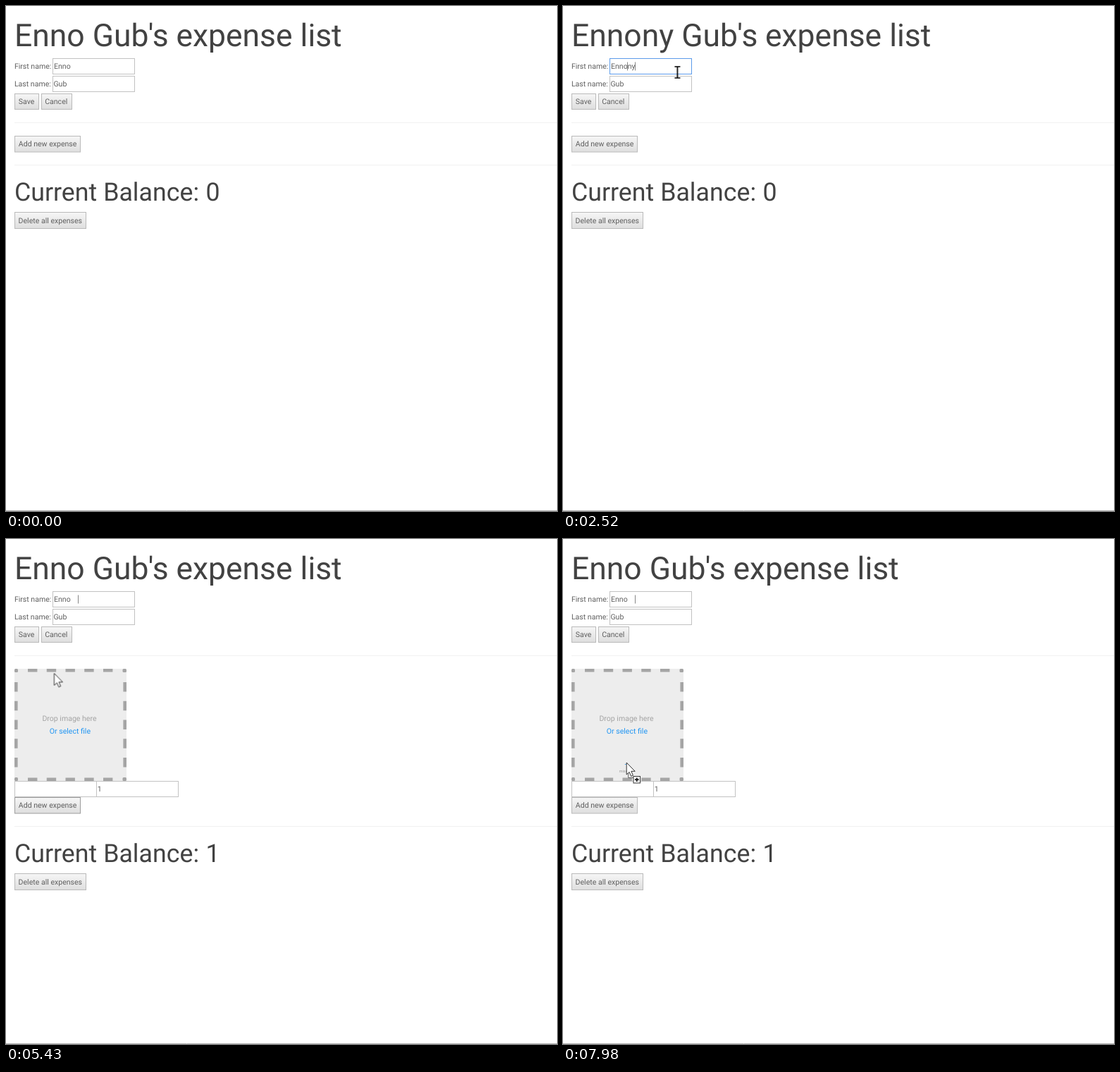
An HTML page that plays this animation: 782x716 px, repeating every 8 s.

```html
<!DOCTYPE html>
<html lang="en">
<head>
<meta charset="utf-8">
<title>Expense list</title>
<style>
  html, body { margin: 0; width: 100%; height: 100%; overflow: hidden; background: #fff; }
  svg { display: block; font: 10.55px Roboto, sans-serif; fill: #5f5f5f; text-rendering: geometricPrecision; }
  .h1 { font-size: 44.45px; fill: #424242; }
  .h2 { font-size: 35.75px; fill: #424242; }
  .field { fill: #fff; stroke: #c2c2c2; }
  .btn { fill: url(#face); stroke: #bababa; }
  .rule { stroke: #f1f1f1; }
  .caret { stroke: #858585; }
  .dash { stroke: #a5a5a5; stroke-width: 4.6; stroke-dasharray: 13.4 13.35; }
  .corner { fill: #a5a5a5; }
  .pointer { fill: #fff; stroke: #111; stroke-width: .85; stroke-linejoin: round; }

  /* every animation shares one 8 s clock */
  .a { animation: 8s step-end -5ms infinite; }

  /* heading and typing */
  .name0 { animation-name: name0; }
  .name1 { animation-name: name1; }
  .name2 { animation-name: name2; }
  .key1 { animation-name: key1; }
  .key2 { animation-name: key2; }
  @keyframes name0 { 0%, 40.375% { visibility: visible } 28.75% { visibility: hidden } }
  @keyframes name1 { 0%, 31.5%, 40.375% { visibility: hidden } 28.75%, 39.5% { visibility: visible } }
  @keyframes name2 { 0%, 39.5% { visibility: hidden } 31.5% { visibility: visible } }
  @keyframes key1 { 0%, 39.5% { visibility: hidden } 27.625% { visibility: visible } }
  @keyframes key2 { 0%, 38.5% { visibility: hidden } 30.75% { visibility: visible } }

  /* focus ring and carets */
  .focus { fill: none; stroke: #5c9bea; animation-name: focus; }
  .caret0 { animation-name: caret0; }
  .caret1 { animation-name: caret1; }
  .caret2 { animation-name: caret2; }
  @keyframes focus { 0%, 63.875% { visibility: hidden } 17.875% { visibility: visible } }
  @keyframes caret0 { 0%, 60% { visibility: hidden } 17.875% { visibility: visible } }
  @keyframes caret1 { 0%, 30.75% { visibility: hidden } 27.625% { visibility: visible } }
  @keyframes caret2 { 0% { visibility: hidden } 30.75%, 100% { visibility: visible } }

  /* new expense */
  .added { animation-name: added; }
  .empty { animation-name: empty; }
  .lower { animation-name: lower; }
  .add { animation-name: hover; }
  .link { fill: #2196f3; animation-name: link; }
  @keyframes added { 0% { visibility: hidden } 65%, 100% { visibility: visible } }
  @keyframes empty { 0% { visibility: visible } 65%, 100% { visibility: hidden } }
  @keyframes lower { 0% { transform: none } 65%, 100% { transform: translateY(182px) } }
  @keyframes hover { 0%, 70.75% { stroke: #bababa } 60% { stroke: #9c9c9c } }
  @keyframes link { 0%, 82.625% { fill: #2196f3 } 77.5% { fill: #1976d2 } }

  /* pointer */
  .move { animation-name: move; }
  .arrow { animation-name: arrow; }
  .beam { animation-name: beam; }
  .hand { animation-name: hand; }
  .drag { animation-name: drag; }
  @keyframes move {
    0% { transform: translate(616px, 618px) }
    4.25% { transform: translate(616px, 618px); animation-timing-function: steps(4) }
    7.5% { transform: translate(305px, 260px); animation-timing-function: steps(3) }
    11% { transform: translate(171px, 98px) }
    12.875% { transform: translate(171px, 98px); animation-timing-function: steps(2, jump-both) }
    14.75% { transform: translate(162.4px, 94px) }
    49.125% { transform: translate(162.4px, 94px); animation-timing-function: steps(5, jump-both) }
    54% { transform: translate(95px, 140px); animation-timing-function: steps(5) }
    58.875% { transform: translate(50px, 176px) }
    60% { transform: translate(50px, 176px); animation-timing-function: steps(1, jump-both) }
    61.125% { transform: translate(69.2px, 184.8px) }
    67.875% { transform: translate(68.4px, 190.5px) }
    70.75% { transform: translate(68.4px, 190.5px); animation-timing-function: steps(7, jump-both) }
    77.5% { transform: translate(85px, 276px) }
    80.75% { transform: translate(88px, 278px) }
    82.625% { transform: translate(88px, 278px); animation-timing-function: steps(5, jump-start) }
    87.125% { transform: translate(98px, 667px) }
    96.875% { transform: translate(107px, 572px); animation-timing-function: steps(3) }
    99.75%, 100% { transform: translate(90.2px, 317px) }
  }
  @keyframes arrow {
    0%, 12.875%, 60%, 76.5%, 87.125% { visibility: hidden }
    4.25%, 52%, 67.875%, 82.625%, 96.875%, 100% { visibility: visible }
  }
  @keyframes beam { 0%, 52% { visibility: hidden } 12.875% { visibility: visible } }
  @keyframes hand {
    0%, 67.875%, 82.625% { visibility: hidden }
    60%, 76.5% { visibility: visible }
  }
  @keyframes drag { 0% { visibility: hidden } 96.875%, 100% { visibility: visible } }
</style>
</head>
<body>
<svg width="782" height="716">
  <defs>
    <linearGradient id="face" x2="0" y2="1">
      <stop stop-color="#f6f6f6"/>
      <stop offset="1" stop-color="#dedede"/>
    </linearGradient>
  </defs>

  <g class="h1">
    <text class="a name0" x="12" y="57">Enno Gub's <tspan x="241.4">expense list</tspan></text>
    <text class="a name1" x="12" y="57">Ennon Gub's <tspan x="266">expense list</tspan></text>
    <text class="a name2" x="12" y="57">Ennony Gub's <tspan x="287">expense list</tspan></text>
  </g>

  <text x="11.9" y="89">First name:</text>
  <rect class="field" x="66.5" y="74.5" width="116" height="22"/>
  <rect class="a focus" x="66.5" y="74.5" width="116" height="22"/>
  <text x="68" y="89.4">Enno<tspan class="a key1">n</tspan><tspan class="a key2">y</tspan></text>
  <path class="a caret caret0" d="M91.5 79.5v12"/>
  <path class="a caret caret1" d="M97.5 79.5v12"/>
  <path class="a caret caret2" d="M102.5 79.5v12"/>

  <text x="11.9" y="114">Last name:</text>
  <rect class="field" x="66.5" y="99.5" width="116" height="22"/>
  <text x="67.4" y="114.3">Gub</text>

  <rect class="btn" x="12.5" y="124.5" width="34" height="22"/>
  <text x="17.8" y="139">Save</text>
  <rect class="btn" x="50.5" y="124.5" width="43" height="22"/>
  <text x="55.2" y="139">Cancel</text>
  <path class="rule" d="M12 165.5H782"/>

  <g class="a added">
    <rect x="12" y="184" width="159" height="159" rx="3" fill="#ededed"/>
    <path class="dash" d="M31 186.3H152M31 340.7H152M14.3 203V324M168.7 203V324"/>
    <g class="corner">
      <rect x="12" y="184" width="5" height="5" rx="1.5"/>
      <rect x="165.5" y="184" width="5.5" height="5" rx="1.5"/>
      <rect x="12" y="338" width="5" height="5" rx="1.5"/>
      <rect x="165.5" y="338" width="5.5" height="5" rx="1.5"/>
    </g>
    <text x="51.4" y="257.5" fill="#a4a4a4">Drop image here</text>
    <text class="a link" x="61.8" y="276.3">Or select file</text>
    <rect class="field" x="12.5" y="343.5" width="116" height="22"/>
    <rect class="field" x="128.5" y="343.5" width="116" height="22"/>
    <text x="129.8" y="358">1</text>
  </g>

  <g class="a lower">
    <rect class="a btn add" x="12.5" y="184.5" width="93" height="22.5"/>
    <text x="17.8" y="199">Add new expense</text>
    <path class="rule" d="M12 225.5H782"/>
    <text class="h2" x="12" y="276">Current Balance: <tspan class="a empty" x="283.6">0</tspan><tspan class="a added" x="283.6">1</tspan></text>
    <rect class="btn" x="12.5" y="292.5" width="101" height="23"/>
    <text x="17.6" y="307.7">Delete all expenses</text>
  </g>

  <path d="M0 715.5H782" stroke="#b2b2b2"/>

  <g class="a move">
    <g class="a drag">
      <text x="-10.5" y="14" font-size="5.5" fill="#999">misc</text>
      <path d="M-2.5 2.5h3" stroke="#5aa9e6"/>
      <path d="M2.5 15v6.5h9" fill="none" stroke="#666"/>
    </g>
    <path class="a pointer arrow" d="M0 0V17L3.9 13.4 6.5 19.4 9.2 18.2 6.7 12.3H12Z"/>
    <g class="a drag">
      <rect x="9.8" y="19.5" width="9.5" height="9.5" fill="#fff" stroke="#333"/>
      <path d="M11.8 24.2h5.6M14.6 21.4V27" stroke="#111" stroke-width="1.7"/>
    </g>
    <path class="a beam" d="M-4-8H4M0-8V8M-4 8H4" fill="none" stroke="#000" stroke-width="1.7"/>
    <path class="a pointer hand" d="M-1.7 1.5C-1.7-.5 1.7-.5 1.7 1.5V7.5C2.5 6.5 4.3 6.8 4.5 8.3 5.3 7.4 6.8 7.8 7 9.2 8 8.6 9 9.3 9 10.6V15C9 17.5 7.6 18.5 7.4 21.5H-1C-1.2 18.5-4 16-6 12.6-6.6 11-4.6 10-3.2 11.4L-1.7 13ZM1.7 8v4M4.5 8.8v3.4M7 9.7v2.8"/>
  </g>
</svg>
</body>
</html>
```
